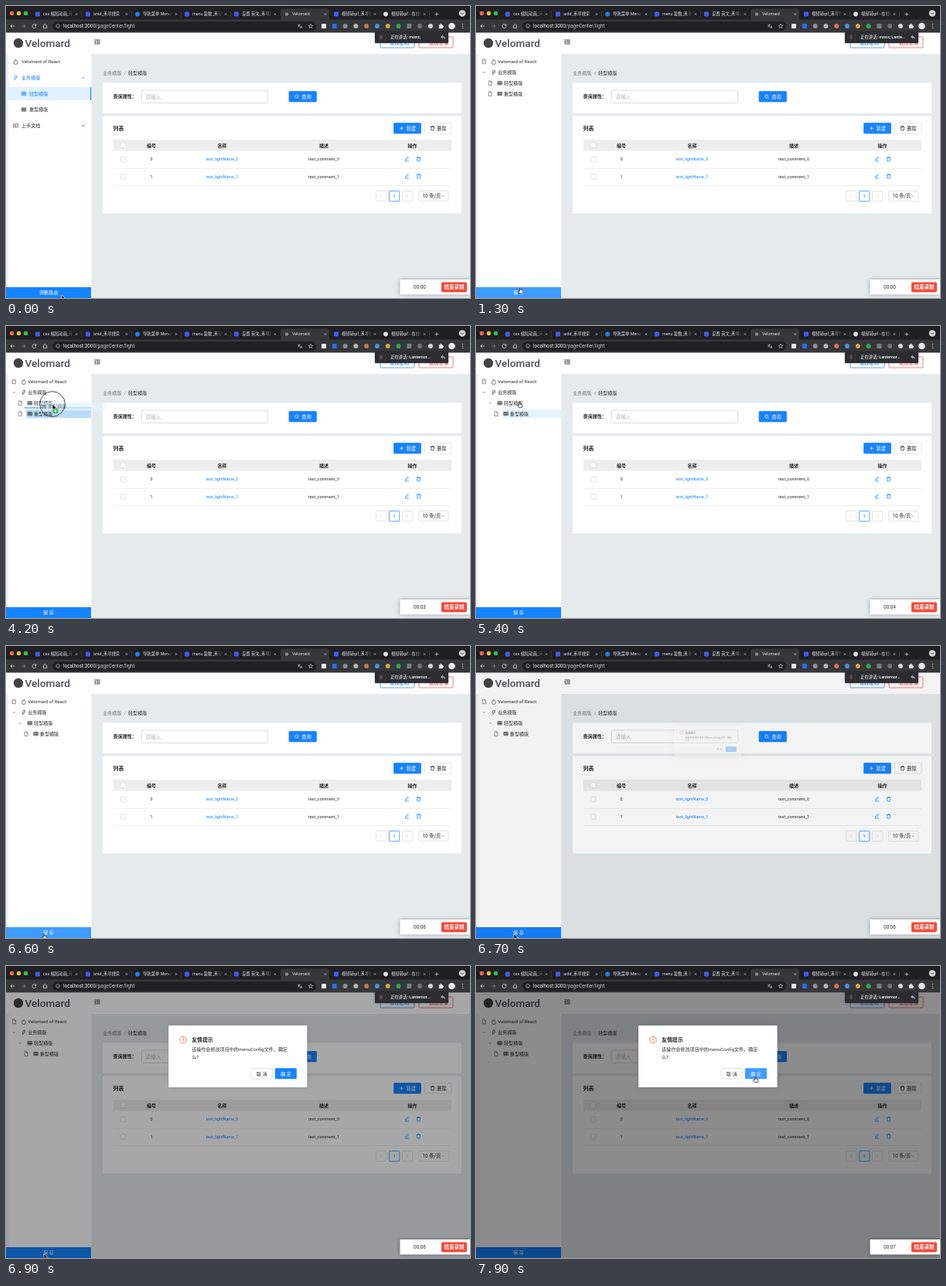
An HTML page with a canvas for the animation above (8 s loop, 600 by 378 pixels).

```html
<!DOCTYPE html>
<html lang="zh-CN">
<head>
<meta charset="utf-8">
<style>
html, body { margin: 0; width: 100%; height: 100%; overflow: hidden; background: #fff }
canvas { display: block; width: 600px; height: 378px }
</style>
</head>
<body>
<canvas></canvas>
<script>
const LOOP = 8000, BLUE = '#1683ff', HOVER = '#3f9bff', INK = '#2b2b2b', GREY = '#d9d9d9';
const FONT = 'Roboto, "Noto Sans CJK SC", "Noto Sans CJK", sans-serif';
const BRAND = 'Velomard';
const canvas = document.querySelector('canvas'), c = canvas.getContext('2d');
const dpr = window.devicePixelRatio || 1;
canvas.width = 600 * dpr;
canvas.height = 378 * dpr;

// Icon outlines, centred on 0,0
const icons = {
  fire: 'M0-3C1-1 2.6-.5 2.4 1.2A2.4 2.4 0 0 1-2.4 1.2C-2.4 0-1.6-.6-1.4-1.4L-.6-.8Q.3-1.8 0-3Z',
  bolt: 'M-.6-2.8H1.6L.5-.8H2L-1.5 2.8L-.7 .3H-1.9Z',
  table: 'M-2.8-2.2H2.8V2.2H-2.8ZM-2.8-.7H2.8M-2.8 .7H2.8M-.9-2.2V2.2M.9-2.2V2.2',
  book: 'M0-1.5V1.8M-2.8-2.2H-1Q0-2.2 0-1.5Q0-2.2 1-2.2H2.8V1.8H-2.8Z',
  file: 'M-2-2.8H.7L2-1.4V2.8H-2ZM.6-2.8V-1.3H2',
  down: 'M-1.6-.8L0 .8L1.6-.8',
  up: 'M-1.6 .8L0-.8L1.6 .8',
  prev: 'M.8-1.7L-.9 0L.8 1.7',
  next: 'M-.8-1.7L.9 0L-.8 1.7',
  edit: 'M-2.7 2.7H2.7M-2 1.2L-1.7-.2L1.1-2.8L2.3-1.7L-.5 1Z',
  trash: 'M-2.7-1.8H2.7M-1-1.8V-2.8H1V-1.8M-2-1.8L-1.7 2.7H1.7L2-1.8',
  search: 'M1.5-.4A1.9 1.9 0 1 1-2.3-.4A1.9 1.9 0 1 1 1.5-.4M1 1L2.6 2.6',
  fold: 'M-3.7-2.6H3.7M-.8-.9H3.7M-.8 .8H3.7M-3.7 2.5H3.7M-2.2-1.2L-3.6 0L-2.2 1.2Z',
  plus: 'M-2.4 0H2.4M0-2.4V2.4',
  close: 'M-1.3-1.3L1.3 1.3M1.3-1.3L-1.3 1.3',
  back: 'M2.6 0H-2.6M-.3-2.4L-2.6 0L-.3 2.4',
  forward: 'M-2.6 0H2.6M.3-2.4L2.6 0L.3 2.4',
  reload: 'M2.2-1.2A2.5 2.5 0 1 0 2.5 .5M2.5-2.6V-.8H.7',
  home: 'M-2.9 0L0-2.6L2.9 0M-2-.5V2.6H2V-.5',
  star: 'M0-2.8L.8-.9L2.8-.8L1.3 .5L1.8 2.5L0 1.4L-1.8 2.5L-1.3 .5L-2.8-.8L-.8-.9Z',
  translate: 'M-2.8-1.6H.6M-1.1-2.6V-1.6M.1-1.6Q-.6 .4-2.6 1.2M-2-.8Q-1.2 .6-.2 1M.2 2.8L1.6-.4L3 2.8M.7 1.7H2.5',
  reply: 'M-.4-2.4L-2.8-.3L-.4 1.8V.5Q1.6 .4 2.7 2.2Q2.3-1-.4-1.1Z',
  mic: 'M-.9-2.4H.9V.4H-.9ZM-1.8 0Q-1.6 1.5 0 1.5Q1.6 1.5 1.8 0M0 1.5V2.8',
  puzzle: 'M-2.3-1.4H-.6Q-1-2.9 0-2.9Q1-2.9 .6-1.4H2V.1Q3.3-.2 3.3 .8Q3.3 1.7 2 1.4V2.7H-2.3Z',
  arrow: 'M0 0V7.4L1.8 5.8L3 8.4L4.2 7.8L3.1 5.4H5.4Z',
  hand: 'M-.7 .6Q0-.4 .7 .6V3L3.4 3.7Q4 4 3.8 5L3.2 7.6H-.6L-2.7 4.6Q-2.2 3.7-1.3 4.4L-.7 4.9Z'
};
for (const k in icons) icons[k] = new Path2D(icons[k]);

function icon(name, x, y, color = INK, width = .6, fill) {
  c.save();
  c.translate(x, y);
  if (fill) { c.fillStyle = fill; c.fill(icons[name]); }
  c.strokeStyle = color;
  c.lineWidth = width;
  c.stroke(icons[name]);
  c.restore();
}
function text(s, x, y, size = 6.1, color = INK, align = 'left', weight = 400) {
  c.font = `${weight} ${size}px ${FONT}`;
  c.textAlign = align;
  c.fillStyle = color;
  c.fillText(s, x, y + size * .36);
}
function box(x, y, w, h, fill, r = 0, stroke) {
  c.beginPath();
  c.roundRect(x, y, w, h, r);
  if (fill) { c.fillStyle = fill; c.fill(); }
  if (stroke) { c.strokeStyle = stroke; c.lineWidth = .7; c.stroke(); }
}
function dot(x, y, r, fill, stroke) {
  c.beginPath();
  c.arc(x, y, r, 0, 7);
  if (fill) { c.fillStyle = fill; c.fill(); }
  if (stroke) { c.strokeStyle = stroke; c.lineWidth = .8; c.stroke(); }
}
function shadowed(blur, alpha, draw) {
  c.save();
  c.shadowColor = `rgba(0,0,0,${alpha})`;
  c.shadowBlur = blur * dpr;
  draw();
  c.restore();
}

const tabs = [
  [41, 'css 缩短动画_禾寻'], [106, 'antd_禾寻搜索'], [170, '导航菜单 Menu - 组'],
  [234, 'menu 复数_禾寻搜'], [298, '设置 英文_禾寻搜'], [363, BRAND],
  [427, '视频转gif_禾寻搜'], [491, '视频转gif - 在线转']
];
const extensions = ['#eee', '#2f6fdc', '#8b9299', '#b9b4ae', '#c77b52', '#4a90d9',
  '#d9a441', '#2dab4f', '#777c80', '#70757a', '#d5d7d9'];

function browser() {
  box(0, 0, 600, 18, '#1f2024');
  ['#fe5f57', '#febc2e', '#28c840'].forEach((f, i) => dot(7.5 + i * 9, 9.5, 2.7, f));
  tabs.forEach(([x, title], i) => {
    const active = i == 5, bg = active ? '#36373b' : '#1f2024';
    if (active) box(355, 3.5, 63, 15, bg, [4, 4, 0, 0]);
    if (i == 2 || i == 7) dot(x, 10.5, 2.9, i == 2 ? '#2d7fe0' : '#e4e6ea');
    else if (active) dot(x, 10.5, 2.3, '#85888c');
    else box(x - 3, 7.5, 6, 6, '#4658e8', 1);
    c.save();
    c.beginPath();
    c.rect(x + 7, 4, 39, 13);
    c.clip();
    text(title, x + 7, 10.5, 5.35, '#e4e6e8');
    const fade = c.createLinearGradient(x + 37, 0, x + 46, 0);
    fade.addColorStop(0, bg + '00');
    fade.addColorStop(1, bg);
    box(x + 36, 4, 11, 13, fade);
    c.restore();
    icon('close', x + 50, 10.5, '#d0d2d5');
    if (i != 4 && !active) box(x + 56.5, 7, .5, 7, '#55575b');
  });
  icon('plus', 557, 10.5, '#ddd', .7);
  dot(590, 9.5, 4.3, '#d5d7d9');
  icon('down', 590, 9.7, '#1f2024', .8);

  box(0, 17.5, 600, 17, '#36373b');
  ['back', 'forward', 'reload', 'home'].forEach((n, i) =>
    icon(n, 8.5 + i * 14, 26, i == 1 ? '#85878a' : '#dcdee0', .8));
  box(60, 20, 341, 12.5, '#202125', 6.2);
  dot(67, 26, 2.4, null, '#a5a8ac');
  box(66.7, 25.7, .7, 1.7, '#a5a8ac');
  text('localhost:3000', 74, 26, 6.4, '#f0f1f2');
  const hostEnd = 74 + c.measureText('localhost:3000').width;
  text('/pageCenter/light', hostEnd, 26, 6.4, '#c5c7ca');
  icon('translate', 380, 26, '#cfd1d4');
  icon('star', 394, 26, '#cfd1d4');
  extensions.forEach((f, i) => {
    const x = 411 + i * 13.8;
    i < 2 || i == 8 ? box(x - 3, 23, 6, 6, f, .8) : dot(x, 26, 3, f);
  });
  icon('puzzle', 562.5, 26, '#eee', .6, '#eee');
  dot(576.5, 26, 4.3, '#e6e8ea');
  [23.4, 26, 28.6].forEach(y => dot(590.5, y, .7, '#ddd'));
}

function button(x, y, w, h, label, labelX, glyph, primary = true) {
  const color = primary ? '#fff' : INK;
  box(x, y, w, h, primary ? BLUE : '#fff', 1, primary ? BLUE : GREY);
  icon(glyph, x + 10, y + h / 2, color, .7);
  text(label, labelX, y + h / 2, 6.3, color);
}

function content() {
  box(110, 34, 490, 344, '#e5ebed');
  box(110, 34, 490, 28, '#fff');
  icon('fold', 118, 46.5, INK, .8);
  box(484, 40, 44, 14, '#fff', 1, BLUE);
  text('修改密码', 496, 47.3, 6.3, BLUE);
  box(534, 40, 44, 14, '#fff', 1, '#f5483d');
  text('退出登录', 547, 47.3, 6.3, '#f5483d');
  text('业务模版', 125, 87, 6.1, '#777');
  text('/', 152.5, 87, 6.1, '#777');
  text('轻型模版', 158, 87);

  box(125, 99.5, 464, 39.5, '#fff');
  text('查询属性：', 138.5, 117.3, 6.1, '#222', 'left', 700);
  box(175.5, 109, 163, 16.5, '#fff', 1, '#cfcfcf');
  text('请输入', 180.5, 117.5, 6.7, '#b5b5b5');
  button(366, 110.5, 35.5, 13.5, '查询', 382.3, 'search');

  box(125, 142.5, 464, 126, '#fff');
  text('列表', 138.5, 158.5, 6.9, '#222', 'left', 700);
  button(501.5, 151.5, 35, 13.5, '新建', 517.5, 'plus');
  button(541.5, 151.5, 34.5, 13.5, '删除', 557.2, 'trash', false);

  box(139, 173, 437, 14.5, '#ededed');
  [['编号', 188], ['名称', 279.5], ['描述', 411], ['操作', 525.5]].forEach(([s, x]) =>
    text(s, x, 180.4, 6, '#222', 'center', 700));
  [180.3, 198.6, 220.8].forEach(y => box(148.3, y - 3.3, 6.6, 6.6, '#fff', 1, GREY));
  [198.4, 220.6].forEach((y, i) => {
    text(i, 188, y, 5.5, INK, 'center');
    text('test_lightName_' + i, 279.5, y, 5.4, BLUE, 'center');
    text('test_comment_' + i, 411, y, 5.4, INK, 'center');
    icon('edit', 518.3, y - .2, BLUE, .7);
    icon('trash', 533.5, y - .2, BLUE, .7);
    box(139, y + 11.6, 437, .6, '#e2e2e2');
  });
  [478.5, 495.5, 512.5].forEach((x, i) => box(x, 239.5, 13.3, 13.3, '#fff', 1, i == 1 ? BLUE : GREY));
  icon('prev', 485, 246, '#b5b5b5');
  icon('next', 519, 246, '#b5b5b5');
  text('1', 502.1, 246, 6.1, BLUE, 'center', 500);
  box(533.5, 239.5, 38.5, 13.3, '#fff', 1, GREY);
  text('10 条/页', 538.5, 246, 6.3);
  icon('down', 565, 246.2, '#999');
}

function menu() {
  box(0, 105, 110, 17, '#e0f2ff');
  box(109, 105, 1.2, 17, BLUE);
  icon('fire', 12.5, 72);
  text(BRAND + ' of React', 20, 72);
  icon('bolt', 12.5, 93, BLUE);
  text('业务模版', 20, 93, 6.1, BLUE);
  icon('up', 100, 93, BLUE, .8);
  icon('table', 23, 113.5, BLUE);
  text('轻型模版', 30, 113.5, 6.1, BLUE);
  icon('table', 23, 134);
  text('重型模版', 30, 134);
  icon('book', 12.5, 155);
  text('上手文档', 20, 155);
  icon('down', 100, 155, INK, .8);
}

function node(level, y, marker, glyph, label) {
  const x = 10.5 + level * 7.8;
  icon(marker, x, y, '#555');
  icon(glyph, x + 12.5, y);
  text(label, x + 17.7, y);
}

const PRESS = 3400, DROP = 4900;
function tree(t) {
  const dragging = t > PRESS && t < DROP, nested = t >= DROP;
  if (dragging) box(26, 108.3, 84, 11, '#bbdcfb');
  if (nested && t < 5700) box(34, 108.3, 76, 10.7, '#e2f3fd');
  node(0, 72, 'file', 'fire', BRAND + ' of React');
  node(0, 86, 'down', 'bolt', '业务模版');
  node(1, 99.8, nested ? 'down' : 'file', 'table', '轻型模版');
  node(nested ? 2 : 1, 113.6, 'file', 'table', '重型模版');
  if (dragging && t > 3800) box(24, 105.6, 86, .9, BLUE);
}

function sidebar(t, editing, hover) {
  box(0, 34, 110.5, 344, '#fefefe');
  const shade = c.createLinearGradient(0, 0, 5, 0);
  shade.addColorStop(0, '#eee');
  shade.addColorStop(1, '#fefefe');
  box(0, 62, 5, 302, shade);
  dot(16, 48, 6.2, '#444');
  text(BRAND, 24.5, 48.3, 13.6, '#46505a', 'left', 500);
  editing ? tree(t) : menu();
  box(0, 364, 110, 14, hover ? HOVER : BLUE);
  text(editing ? '保 存' : '调整路由', 55, 371, 6.2, '#fff', 'center', 500);
}

// The mask fades evenly while the dialog zooms with a steep ease-out
const MODAL = 6670;
function modal(t, hover) {
  const p = Math.min(1, (t - MODAL) / 300), e = 1 - (1 - p) ** 4, s = .2 + .8 * e;
  box(0, 34.5, 600, 343.5, `rgba(0,0,0,${.45 * p})`);
  c.save();
  c.globalAlpha = e;
  c.translate(299.7, 117 + 9 * (1 - e));
  c.scale(s, s);
  c.translate(-299.7, -117);
  shadowed(6, .1, () => box(210, 77, 179.5, 80, '#fff', 1));
  dot(229, 95.7, 4.3, null, '#f5622d');
  box(228.6, 93.2, .9, 3.2, '#f5622d');
  box(228.6, 97.3, .9, .9, '#f5622d');
  text('友情提示', 240, 95.7, 6.9, '#222', 'left', 700);
  text('该操作会修改项目中的menuConfig文件，确定', 240, 108, 6.1);
  text('么?', 240, 117.8, 6.1);
  box(317, 132.5, 27.5, 13.5, '#fff', 1, GREY);
  text('取 消', 330.8, 139.3, 6.2, INK, 'center');
  box(348, 132.2, 28, 14, hover ? HOVER : BLUE, 1);
  text('确 定', 362, 139.3, 6.2, '#fff', 'center', 500);
  c.restore();
}

function overlays(t) {
  shadowed(3, .3, () => box(477, 33, 95, 15, '#2b2d32', 1));
  icon('mic', 485, 40.5, '#a56a62', .7);
  box(490.5, 36, .5, 9, '#45474c');
  const who = t < 1000 ? 'moss;' : t < 3300 ? 'moss; Lante...' : 'Lanternor...';
  text('正在讲话: ' + who, 497, 40.5, 5.4, '#fff', 'left', 500);
  icon('reply', 565, 40.3, '#a5a7aa', .5, '#a5a7aa');

  shadowed(5, .35, () => box(509.5, 354, 92, 19.5, '#fff', 1));
  const sec = Math.max(0, Math.floor((t - 500) / 1000));
  text('00:0' + sec, 535, 364, 6.4, INK, 'center');
  box(563, 357.5, 33, 13, '#f04b3c', 2);
  text('结束录制', 579.5, 364, 6.5, '#fff', 'center', 700);
}

// time, x, y of the pointer tip
const path = [
  [0, 72, 374], [500, 60, 371], [1200, 58, 371], [2300, 22, 97.5], [2800, 22, 97.5],
  [3300, 52, 110], [3500, 52, 110], [4200, 60, 101], [4900, 57, 99], [5500, 56, 98],
  [6200, 49, 372.5], [6950, 49, 372.5], [7600, 361, 143], [LOOP, 361, 143]
];
function pointer(t) {
  const i = path.findIndex(k => k[0] > t), [t0, x0, y0] = path[i - 1], [t1, x1, y1] = path[i];
  const p = (t - t0) / (t1 - t0), e = p * p * (3 - 2 * p);
  return [x0 + (x1 - x0) * e, y0 + (y1 - y0) * e];
}

function drag(x, y) {
  c.save();
  c.globalAlpha = .6;
  const fade = c.createLinearGradient(x - 16, 0, x + 69, 0);
  fade.addColorStop(0, '#d5edfb');
  fade.addColorStop(1, '#e4f5fc');
  box(x - 16, y - 2, 85, 10.5, fade);
  icon('table', x - 11, y + 3.3);
  text('重型模版', x - 6, y + 3.3);
  c.restore();
}

function draw(t) {
  const [x, y] = pointer(t);
  const editing = t >= 900, asking = t >= MODAL, dragging = t > PRESS && t < DROP;
  const onSave = !asking && x < 110 && y > 364 && y < 373.5;
  const onConfirm = asking && x > 348 && x < 376 && y > 132 && y < 146;
  c.setTransform(dpr, 0, 0, dpr, 0, 0);
  content();
  sidebar(t, editing, onSave);
  if (asking) modal(t, onConfirm);
  browser();
  overlays(t);
  if (dragging) {
    drag(x, y);
    dot(x, y, 16.3, null, '#222');
  }
  const hand = onSave || onConfirm || t > DROP && t < 5800;
  icon(hand ? 'hand' : 'arrow', x, y, hand ? '#111' : '#fff', .7, hand ? '#fff' : '#000');
  if (dragging) {
    dot(x + 4, y + 9, 3.6, '#27b34a');
    icon('plus', x + 4, y + 9, '#fff', .9);
  }
}

function frame() {
  draw(performance.now() % LOOP);
  requestAnimationFrame(frame);
}
frame();
</script>
</body>
</html>
```
